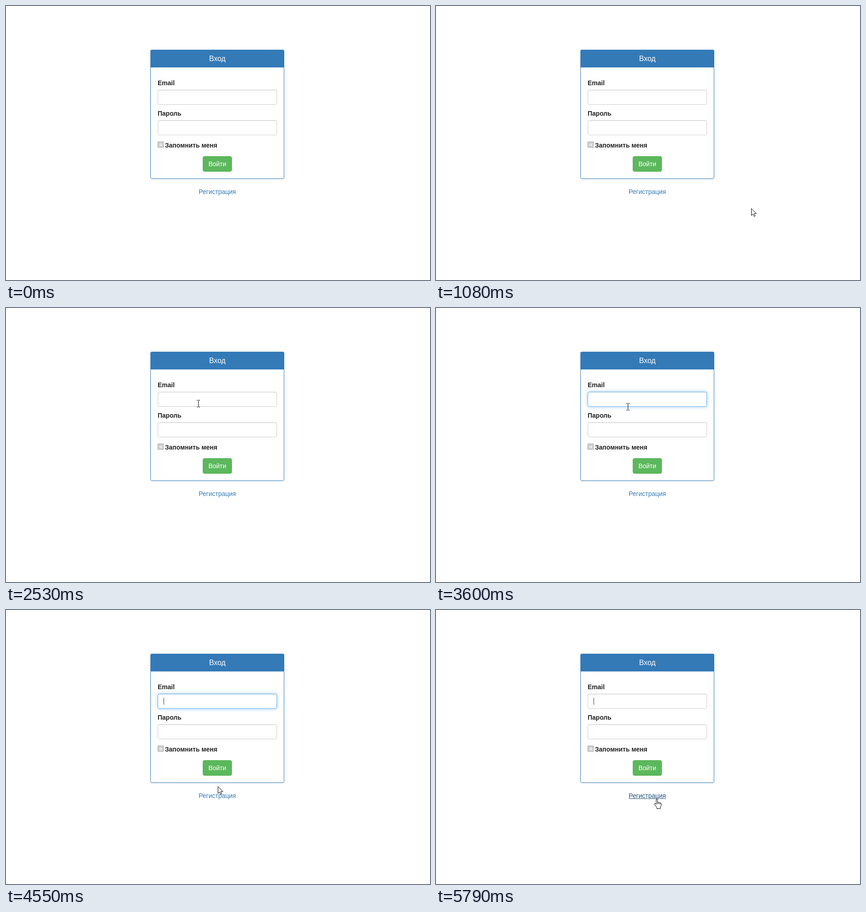
Recreate the animation shown at these times as an HTML page. Size 931x602 px, loop 8 s.

```html
<!DOCTYPE html>
<html lang="ru">
<head>
<meta charset="utf-8">
<title>Вход</title>
<style>
  html, body { margin: 0; width: 100%; height: 100%; overflow: hidden; background: #fff; }
  body { position: relative; font: 14px/20px Arial, "Liberation Sans", sans-serif; color: #333; }
  body *, body *::before { box-sizing: border-box; }
  body > * { position: absolute; white-space: nowrap; }
  .panel { left: 317px; top: 96px; width: 294px; height: 284px; border: 1px solid #337ab7; border-radius: 4px;
    box-shadow: 0 1px 1px rgba(0, 0, 0, .05); }
  .head { left: 317px; top: 96px; width: 294px; height: 39px; padding-top: 10px; background: #337ab7;
    border-radius: 4px 4px 0 0; color: #fff; font-size: 16px; text-align: center; }
  .label { left: 333px; font-weight: bold; color: #222; }
  .input { left: 333px; width: 262px; height: 33px; border: 1px solid #ccc; border-radius: 4px;
    box-shadow: inset 0 1px 1px rgba(0, 0, 0, .075); }
  .glow { border-color: #66afe9; background: #fff;
    box-shadow: inset 0 1px 1px rgba(0, 0, 0, .075), 0 0 8px rgba(102, 175, 233, .6); }
  #caret { left: 346px; top: 193px; width: 1px; height: 15px; background: #333; }
  #check { left: 333px; top: 298px; width: 13px; height: 13px; border: 1px solid #8e8f8f; background: #f4f4f4; }
  #check::before { content: ""; position: absolute; inset: 1px; border: 1px solid #aeb3b9;
    background: linear-gradient(135deg, #cbcfd5, #f6f6f6); }
  #check.hover { border-color: #3c7fb1; background: #def9fa; }
  #check.hover::before { border-color: #79c6f9; background: linear-gradient(135deg, #b1dffd, #e9f7fe); }
  #button { left: 432px; top: 330px; width: 64px; height: 34px; padding-top: 6px; border: 1px solid #4cae4c;
    border-radius: 4px; background: #5cb85c; color: #fff; text-align: center; }
  #button.hover { border-color: #398439; background: #449d44; }
  #link { left: 364px; top: 398px; width: 200px; color: #337ab7; text-align: center; }
  #link.hover { color: #23527c; text-decoration: underline; }
  svg { left: 0; top: 0; width: 100%; height: 100%; }
  svg path { fill: #fff; stroke: #000; stroke-linejoin: round; }
  #text path { fill: none; }
</style>
</head>
<body>
<div class="panel"></div>
<div class="head">Вход</div>
<div class="label" style="top:159px">Email</div>
<div class="input" style="top:184px"></div>
<div class="input glow" id="glow" style="top:184px"></div>
<div id="caret"></div>
<div class="label" style="top:226px">Пароль</div>
<div class="input" style="top:251px"></div>
<div id="check"></div>
<div class="label" style="left:349px;top:296px">Запомнить меня</div>
<div id="button">Войти</div>
<div id="link">Регистрация</div>
<svg>
  <g id="arrow"><path d="M.5 .8V16.2L4 12.8L6.4 18.4L8.8 17.4L6.5 11.9H11.4Z"/></g>
  <g id="text"><path d="M-3 -7.5H-.5L.5 -6.5L1.5 -7.5H4M.5 -6.5V6.5M-3 7.5H-.5L.5 6.5L1.5 7.5H4"/></g>
  <g id="hand"><path transform="translate(-5)" d="M4.5 12V2Q4.5 .5 6 .5T7.5 2V8Q8.5 6.3 10.2 8.3Q11.7 7.1 13 9.1Q15.5 8.5 15.5 11V15L13.5 18V21.5H6V18.5L.8 12.5Q.5 10 2.5 10.2ZM7.5 8V11.5M10.2 8.3V11.5M13 9.1V11.5"/></g>
</svg>
<script>
  const LOOP = 8000;
  const START = [798, 575];
  const linear = k => k;
  const easeOut = k => k * (2 - k);

  // Pointer legs: start ms, end ms, number of jumps, end x, end y, easing
  const legs = [
    [650, 1080, 7, 692, 444, linear],
    [1080, 1360, 5, 605, 337, linear],
    [1400, 1820, 7, 498, 251, linear],
    [1820, 2210, 6, 434, 219, easeOut],
    [2218, 2530, 5, 422, 210, linear],
    [3520, 3600, 1, 421, 217, linear],
    [3600, 4320, 10, 449, 330, linear],
    [4340, 4550, 3, 465, 387, linear],
    [4550, 4820, 4, 483, 414, easeOut],
    [5700, 5790, 1, 484, 415, linear],
  ];

  const $ = id => document.getElementById(id);
  const show = (id, on) => { $(id).style.display = on ? '' : 'none'; };
  const clamp = v => Math.min(1, Math.max(0, v));

  function pointerAt(t) {
    let [x, y] = START;
    for (const [t0, t1, jumps, endX, endY, ease] of legs) {
      if (t < t0) break;
      const k = ease(clamp(Math.floor((t - t0) / (t1 - t0) * jumps + 1e-6) / jumps));
      x += (endX - x) * k;
      y += (endY - y) * k;
    }
    return [Math.round(x), Math.round(y)];
  }

  // Three-step fade, visible from its first step on
  const fade = (t, t0, step) => clamp((Math.floor((t - t0) / step) + 1) / 3);

  function draw(t) {
    const [x, y] = pointerAt(t);
    const inside = (l, top, r, b) => t >= 650 && x >= l && x < r && y >= top && y < b;
    const onField = inside(333, 184, 595, 218) || inside(333, 251, 595, 285);
    const onButton = inside(432, 331, 496, 364);
    const onLink = inside(423, 399, 505, 418);
    const shape = onField ? 'text' : onButton || onLink ? 'hand' : 'arrow';

    for (const id of ['arrow', 'text', 'hand']) {
      show(id, t >= 650 && id === shape);
      $(id).setAttribute('transform', `translate(${x} ${y})`);
    }
    $('check').classList.toggle('hover', inside(333, 296, 465, 331));
    $('button').classList.toggle('hover', onButton);
    $('link').classList.toggle('hover', onLink);
    $('glow').style.opacity = fade(t, 3060, 65) - fade(t, 5400, 90);
    show('caret', t >= 3060 && t < 3600 || t >= 4130);
  }

  const begin = performance.now();
  function tick() {
    draw((performance.now() - begin) % LOOP);
    requestAnimationFrame(tick);
  }
  tick();
</script>
</body>
</html>
```
